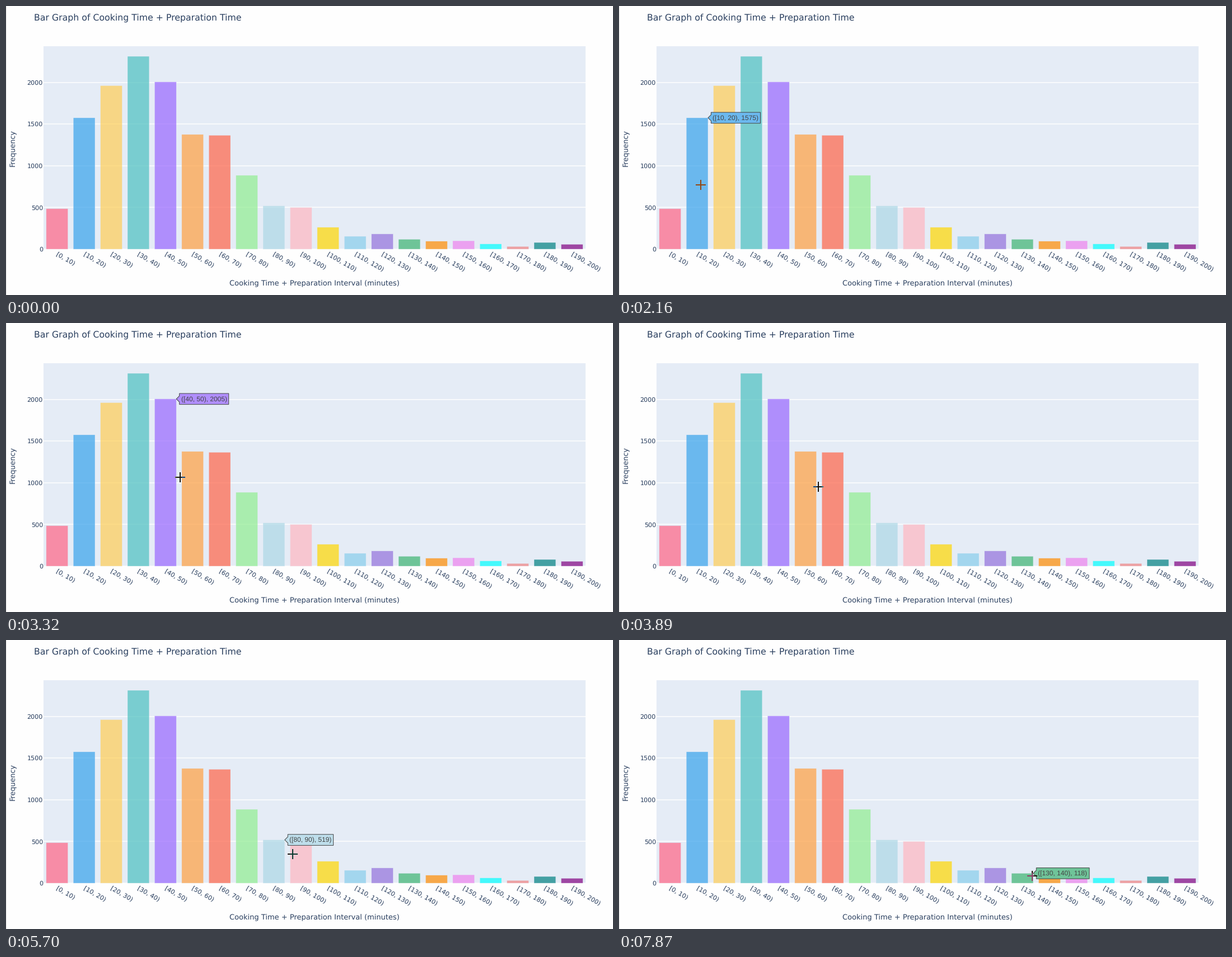
Animation, 1084 px wide and 517 px high, one loop 8 s. Source, as a matplotlib script:

```python
import matplotlib.pyplot as plt
import numpy as np
from matplotlib.animation import FuncAnimation
from matplotlib.colors import to_rgb
from matplotlib.patches import Polygon, Rectangle

W, H, DPI = 1084, 517, 100
LOOP, INTERVAL = 8000, 25
PT = 72 / DPI  # points per pixel

LEFT, RIGHT, TOP, BASE = 67, 1035, 72, 435
STEP = (RIGHT - LEFT) / 20
HALF = 0.4 * STEP
UNIT = 0.1492  # pixels per recipe
INK = "#2a3f5f"
PAGE = np.array(to_rgb("#fefefe"))
PLOT = np.array(to_rgb("#e5ecf6"))
OPACITY = 0.7

COUNTS = np.array([485, 1575, 1960, 2312, 2005, 1375, 1365, 885, 519, 500,
                   262, 154, 182, 118, 95, 100, 62, 32, 80, 58])
COLORS = ["#ff6384", "#36a2eb", "#ffce56", "#4bc0c0", "#9966ff", "#ff9f40",
          "tomato", "lightgreen", "lightblue", "lightpink", "gold", "skyblue",
          "mediumpurple", "mediumseagreen", "darkorange", "violet", "cyan",
          "lightcoral", "teal", "purple"]
CENTERS = LEFT + STEP * (np.arange(20) + 0.5)
TOPS = BASE - UNIT * COUNTS
FILLS = np.array([OPACITY * np.array(to_rgb(c)) + (1 - OPACITY) * PLOT
                  for c in COLORS])
LABELS = [f"[{10 * i}, {10 * i + 10})" for i in range(20)]

# Key points of the pointer: time in ms, x, y.
PATH = np.array([
    (250, 422, 518), (300, 351, 518), (660, 224, 522), (1300, 87, 425),
    (1460, 89, 414), (1740, 89, 414), (2250, 160, 297), (2800, 240, 257),
    (3340, 317, 277), (3700, 353, 291), (3875, 356, 293), (4200, 393, 312),
    (4800, 466, 366), (5240, 466, 366), (5700, 512, 383), (6000, 546, 389),
    (6500, 600, 412), (6775, 630, 418), (7850, 738, 422),
])
HOVER_LAG = 150
ARM = 9

plt.rcParams["text.hinting"] = "none"
plt.rcParams["font.family"] = "DejaVu Sans"

fig = plt.figure(figsize=(W / DPI, H / DPI), dpi=DPI, facecolor=PAGE)
ax = fig.add_axes([0, 0, 1, 1])
ax.axis("off")


def put_text(x, y, text, size, **style):
    style = {"color": INK, "va": "baseline", "rotation_mode": "anchor", **style}
    return ax.text(x, y, text, fontsize=size * PT, **style)


def draw_chart():
    ax.add_patch(Rectangle((0, 0), 1, H, fc="#e2e2e2", lw=0))
    ax.add_patch(Rectangle((LEFT, TOP), RIGHT - LEFT, BASE - TOP, fc=PLOT, lw=0))
    for value in range(0, 2001, 500):
        y = BASE - UNIT * value
        ax.plot([LEFT, RIGHT], [y, y], color="white", lw=1.5 * PT,
                solid_capstyle="butt", zorder=1)
        put_text(66, y + 4, str(value), 11.1, ha="right")
    for x, top, color, label in zip(CENTERS, TOPS, COLORS, LABELS):
        ax.add_patch(Rectangle((x - HALF, top), 2 * HALF, BASE - top, fc=color,
                               ec=PLOT, lw=0.5 * PT, alpha=OPACITY,
                               snap=False, zorder=2))
        put_text(x - 2.3, 446, label, 11.1, rotation=-30)
    put_text(50, 26, "Bar Graph of Cooking Time + Preparation Time", 15.7)
    put_text(551, 500.5, "Cooking Time + Preparation Interval (minutes)", 13,
             ha="center")
    put_text(16, 254, "Frequency", 12.7, ha="center", rotation=90)


def pointer_at(t):
    return [np.interp(t, PATH[:, 0], PATH[:, k]) for k in (1, 2)]


def bar_index(x, y):
    """Index of the bar under each point, or -1."""
    i = np.clip(np.floor((x - LEFT) / STEP).astype(int), 0, 19)
    inside = (abs(x - CENTERS[i]) <= HALF) & (y >= TOPS[i]) & (y < BASE)
    return np.where(inside, i, -1)


def backdrop(x, y):
    i = bar_index(x, y)
    in_plot = (x >= LEFT) & (x < RIGHT) & (y >= TOP) & (y < BASE)
    ground = np.where(in_plot[..., None], PLOT, PAGE)
    return np.where((i >= 0)[..., None], FILLS[i], ground)


draw_chart()

tip_box = ax.add_patch(Polygon([(0, 0), (1, 0), (1, 1)], ec="#444444",
                               lw=PT, snap=False, zorder=5))
tip_text = put_text(0, 0, "", 12, color="#444444", family="Liberation Sans",
                    zorder=6)

offsets = np.arange(-ARM, ARM) + 0.5
DX, DY = np.meshgrid(offsets, offsets)
CROSS = ((abs(DX) < 1) | (abs(DY) < 1)).astype(float)
pointer = ax.imshow(np.zeros((2 * ARM, 2 * ARM, 4)), interpolation="nearest",
                    aspect="auto", zorder=8)


def show_tip(i):
    tip_box.set_visible(i >= 0)
    tip_text.set_visible(i >= 0)
    if i < 0:
        return
    x, y = CENTERS[i] + HALF, TOPS[i]
    label = f"({LABELS[i]}, {COUNTS[i]})"
    # Digits are 0.556 em wide, round brackets 0.333, all else 0.278.
    em = sum(0.556 if c.isdigit() else 0.333 if c in "()" else 0.278
             for c in label)
    near, far, notch, half = x + 5.5, x + 11.5 + 12 * em, 5.5, 9.8
    tip_box.set_xy([(x, y), (near, y + notch), (near, y + half),
                    (far, y + half), (far, y - half), (near, y - half),
                    (near, y - notch)])
    tip_box.set_facecolor(FILLS[i])
    tip_text.set_position((near + 3, y + 4.2))
    tip_text.set_text(label)


def show_pointer(x, y, visible):
    x, y = round(x), round(y)
    pointer.set_visible(visible)
    # The crosshair inverts whatever lies beneath it.
    inverse = 1 - backdrop(x + DX, y + DY)
    pointer.set_data(np.dstack([inverse, CROSS]))
    pointer.set_extent((x - ARM, x + ARM, y + ARM, y - ARM))
    ax.set_xlim(0, W)
    ax.set_ylim(H, 0)


def update(n):
    t = n * INTERVAL
    # The pointer brushes the lower edge once before it comes in.
    show_pointer(*pointer_at(t), 250 <= t < 300 or t >= 660)
    show_tip(int(bar_index(*pointer_at(t - HOVER_LAG))))
    return tip_box, tip_text, pointer


anim = FuncAnimation(fig, update, frames=LOOP // INTERVAL, interval=INTERVAL,
                     repeat=True, repeat_delay=0)
plt.show()
```
